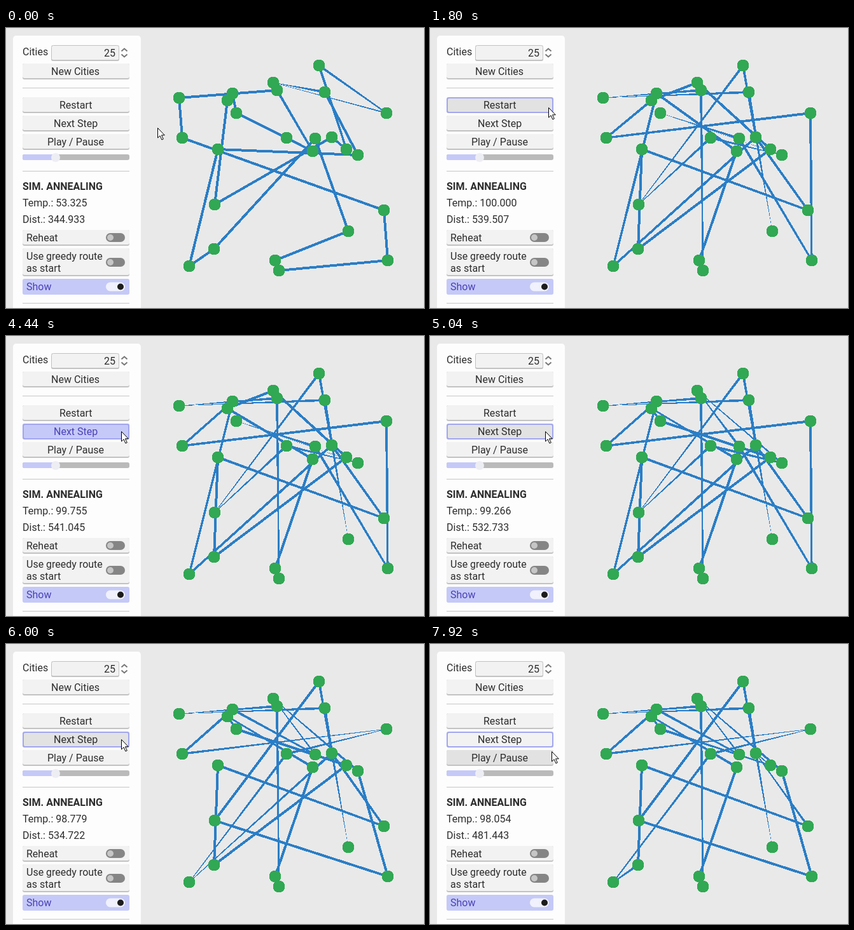
Write an HTML page with a canvas that moves like this. It is 657x441 px and loops after 8 s.

```html
<!DOCTYPE html>
<html lang="en">
<head>
<meta charset="utf-8">
<title>Route annealing</title>
<style>
html, body { margin: 0; width: 100%; height: 100%; overflow: hidden; background: #e9e9e9; }
canvas { display: block; }
</style>
</head>
<body>
<canvas id="stage" width="657" height="441"></canvas>
<script>
const ctx = document.getElementById('stage').getContext('2d');
const LOOP = 8000, TICK = 120;
const INK = '#2d2d2d', ACCENT = '#c5c9f7', ACCENT_INK = '#4a41b8';
const LINE = '#2a7ec6', CITY = '#31a853';
const LINE_WIDTH = 4, MITER_LIMIT = 3, CITY_RADIUS = 9.5;

const cities = {
  a: [492, 59], b: [420, 86], c: [426, 98], d: [501, 101], e: [598, 134],
  f: [356, 103], g: [348, 114], h: [272, 110], i: [362, 134], j: [277, 173],
  k: [333, 191], l: [441, 173], m: [486, 174], n: [482, 194], o: [512, 172],
  p: [535, 191], q: [553, 200], r: [594, 287], s: [538, 320], t: [600, 366],
  u: [423, 366], v: [429, 382], w: [328, 278], x: [327, 348], y: [288, 375]
};

// Annealing moves on a route: reverse a stretch, or exchange two cities
const flip = (a, b) => r => {
  const i = r.indexOf(a), j = r.indexOf(b) + 1;
  return r.slice(0, i) + [...r.slice(i, j)].reverse().join('') + r.slice(j);
};
const swap = (a, b) => r => r.replace(/./g, c => c === a ? b : c === b ? a : c);
const keep = r => r;

const RESTART = 1800, COOLING = Math.pow(0.98054, 1 / 8);
const steps = [
  { at: 3960, move: flip('f', 'g'), dist: 541.045 },
  { at: 4560, move: swap('b', 'i'), dist: 532.733 },
  { at: 5040, move: keep },
  { at: 5520, move: swap('l', 't'), dist: 526.206 },
  { at: 6000, move: flip('m', 'y'), dist: 534.722 },
  { at: 6360, move: keep },
  { at: 6840, move: flip('o', 'x'), dist: 481.443 },
  { at: 7200, move: keep }
];
const clicks = [RESTART, ...steps.map(s => s.at)];

function stateAt(t) {
  if (t < RESTART) return { temp: 53.325, dist: 344.933, route: 'jrtvusmxykqdbeapowgfilnch' };
  const state = { temp: 100, dist: 539.507, route: 'jetmiqlwasdhcvunfyorkxpbg' };
  for (const { at, move, dist = state.dist } of steps) {
    if (t < at) break;
    state.temp *= COOLING;
    state.dist = dist;
    state.route = move(state.route);
  }
  return state;
}

const glides = [
  { at: 720, ticks: 7, to: [187, 125] },
  { at: 2160, ticks: 5, to: [215, 150] },
  { at: 3360, ticks: 4, to: [182, 150] },
  { at: 7440, ticks: 5, to: [192, 169] }
];

function pointer(t) {
  let pos = [239, 157];
  for (const { at, ticks, to } of glides) {
    if (t < at) break;
    const k = Math.min(1, (Math.floor((t - at) / TICK) + 1) / ticks);
    pos = pos.map((v, i) => v + (to[i] - v) * k);
  }
  return pos.map(Math.round);
}

function box(x, y, w, h, r, fill) {
  ctx.fillStyle = fill;
  ctx.beginPath();
  ctx.roundRect(x, y, w, h, r);
  ctx.fill();
}

function outline(x, y, w, h, color, width) {
  ctx.strokeStyle = color;
  ctx.lineWidth = width;
  ctx.beginPath();
  ctx.roundRect(x + width / 2, y + width / 2, w - width, h - width, 3);
  ctx.stroke();
}

function disc(x, y, r, fill) {
  ctx.fillStyle = fill;
  ctx.beginPath();
  ctx.arc(x, y, r, 0, Math.PI * 2);
  ctx.fill();
}

// align: 0 left, 0.5 centre, 1 right; text starts on a whole pixel
function label(str, x, y, align = 0, color = INK, weight = 400) {
  ctx.font = weight + ' 16px Roboto, sans-serif';
  ctx.fillStyle = color;
  ctx.fillText(str, Math.floor(x - ctx.measureText(str).width * align), y);
}

function raised(x, y, w, h, fill = '#f2f2f2') {
  box(x, y, w, h, 3, '#c2c2c2');
  box(x, y, w, h - 2, 3, fill);
}

function button(str, y, ui) {
  const [px, py] = ui.mouse;
  const hover = px >= 26 && px < 194 && py >= y && py < y + 25;
  const focus = ui.focus === str, down = focus && ui.down;
  raised(26, y, 168, 25, down ? ACCENT : hover ? '#e2e2e2' : '#f2f2f2');
  if (focus) outline(26, y, 168, 25, '#a2a6ef', 2);
  label(str, 110, y + 18, 0.5, down ? ACCENT_INK : INK);
}

function toggle(y, on) {
  box(157, y - 7, 30, 14, 7, on ? '#f0f1fd' : '#858585');
  disc(on ? 180 : 164, y, 5, on ? '#1c1c1c' : '#c6c6c6');
}

function chevron(y, d) {
  ctx.strokeStyle = '#777';
  ctx.lineWidth = 2;
  ctx.beginPath();
  ctx.moveTo(181.5, y);
  ctx.lineTo(186, y + d);
  ctx.lineTo(190.5, y);
  ctx.stroke();
}

function panel(state, ui) {
  box(11, 12, 201, 460, 5, '#fdfdfd');
  label('Cities', 26, 43);
  raised(71, 27, 107, 25);
  outline(71, 27, 107, 25, '#c2c2c2', 1);
  label('25', 172, 45, 1);
  chevron(36.5, -4);
  chevron(41.5, 4);
  button('New Cities', 56, ui);
  ['Restart', 'Next Step', 'Play / Pause'].forEach((s, i) => button(s, 109 + 29 * i, ui));
  for (const y of [94, 225, 433]) box(26, y, 168, 1, 0, '#c6c6c6');

  box(26, 199, 168, 9, 3, '#bababa');
  box(26, 199, 52, 9, 3, ACCENT);
  disc(78, 204, 7, '#ededf4');

  label('SIM. ANNEALING', 26, 255, 0, INK, 700);
  label('Temp.: ' + state.temp.toFixed(3), 26, 281);
  label('Dist.: ' + state.dist.toFixed(3), 26, 307);

  raised(26, 318, 168, 25);
  label('Reheat', 32, 336);
  toggle(330, false);
  raised(26, 347, 168, 44);
  label('Use greedy route', 32, 365);
  label('as start', 32, 384);
  toggle(369, false);
  box(26, 395, 168, 25, 3, ACCENT);
  label('Show', 32, 413, 0, ACCENT_INK);
  toggle(407.5, true);
}

// Hard-edged polygon fill, one pixel row at a time
function fillRows(pts) {
  const ys = pts.map(p => p[1]);
  const end = Math.max(...ys);
  for (let y = Math.floor(Math.min(...ys)); y < end; y++) {
    const c = y + 0.5;
    let lo = Infinity, hi = -Infinity;
    pts.forEach(([x0, y0], i) => {
      const [x1, y1] = pts[(i + 1) % pts.length];
      if ((y0 <= c) === (y1 <= c)) return;
      const x = x0 + (x1 - x0) * (c - y0) / (y1 - y0);
      lo = Math.min(lo, x);
      hi = Math.max(hi, x);
    });
    const from = Math.round(lo), to = Math.round(hi);
    if (to > from) ctx.fillRect(from, y, to - from, 1);
  }
}

function normal(a, b) {
  const dx = b[0] - a[0], dy = b[1] - a[1], len = Math.hypot(dx, dy);
  return [-dy / len, dx / len];
}

// Mitred joints; past the limit the stroke tapers into the sharp corner
function tour(route) {
  const pts = [...route].map(c => cities[c]);
  const n = pts.length;
  const sides = pts.map((p, i) => {
    const a = normal(pts[(i + n - 1) % n], p), b = normal(p, pts[(i + 1) % n]);
    const sx = a[0] + b[0], sy = a[1] + b[1], len = Math.hypot(sx, sy);
    const k = Math.min(2 / len, MITER_LIMIT) * LINE_WIDTH / 2 / len;
    return [1, -1].map(s => [p[0] + sx * k * s, p[1] + sy * k * s]);
  });
  ctx.fillStyle = LINE;
  sides.forEach((s, i) => {
    const e = sides[(i + 1) % n];
    fillRows([s[0], e[0], e[1], s[1]]);
  });
}

function dot([x, y]) {
  const ring = Array.from({ length: 64 }, (_, i) => {
    const a = i * Math.PI / 32;
    return [x + CITY_RADIUS * Math.cos(a), y + CITY_RADIUS * Math.sin(a)];
  });
  ctx.fillStyle = CITY;
  fillRows(ring);
}

const arrow = new Path2D('M0 0V15.5L3.6 12.2 6.4 18.5 8.8 17.4 6 11.3H10.8Z');

function cursor([x, y]) {
  ctx.save();
  ctx.translate(x - 0.5, y + 0.5);
  ctx.fillStyle = '#fff';
  ctx.fill(arrow);
  ctx.strokeStyle = '#000';
  ctx.lineWidth = 1;
  ctx.stroke(arrow);
  ctx.restore();
}

function draw(t) {
  const state = stateAt(t);
  const pressed = clicks.filter(c => t >= c - TICK);
  const ui = {
    mouse: pointer(t),
    focus: ['', 'Restart', 'Next Step'][Math.min(pressed.length, 2)],
    down: pressed.length > 0 && t < pressed[pressed.length - 1]
  };
  ctx.fillStyle = '#e9e9e9';
  ctx.fillRect(0, 0, 657, 441);
  tour(state.route);
  Object.values(cities).forEach(dot);
  panel(state, ui);
  cursor(ui.mouse);
}

const start = performance.now();
function loop() {
  draw((performance.now() - start) % LOOP);
  requestAnimationFrame(loop);
}
loop();
</script>
</body>
</html>
```
